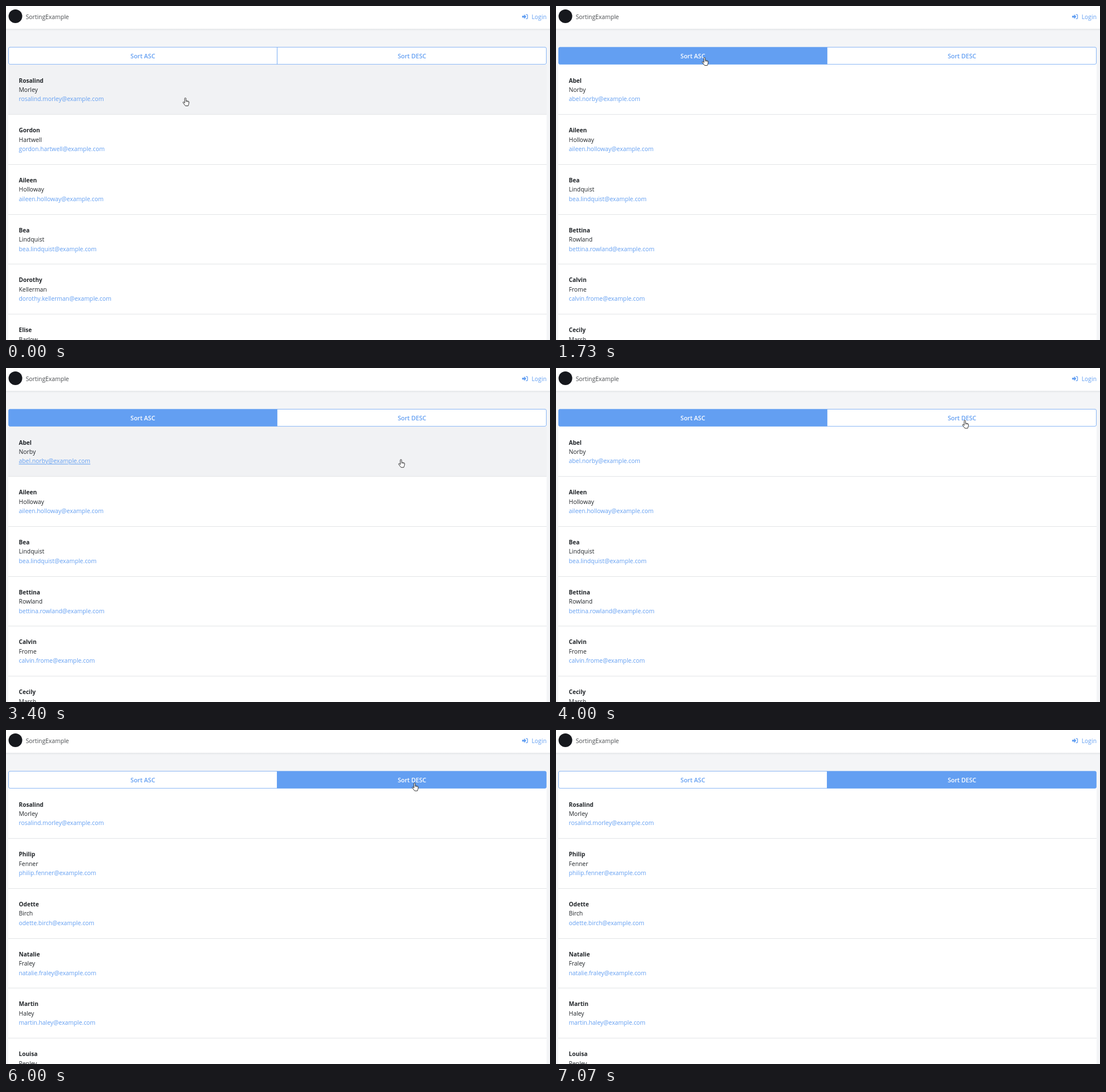
These frames come from a looping animation (954 by 587 pixels, 7870 ms). An HTML page:

```html
<!DOCTYPE html>
<html lang="en">
<head>
<meta charset="utf-8">
<title>SortingExample</title>
<style>
  html, body { margin: 0; width: 100%; height: 100%; overflow: hidden; background: #f4f5f7; }
  svg { display: block; width: 954px; height: 587px; font: 10.35px "Open Sans", "Noto Sans", sans-serif; fill: #212529; }
  .first { font-weight: 700; font-size: 10.1px; }
  .link { fill: #639ff2; }
  .hover .link { text-decoration: underline; }
  .button { font-weight: 600; font-size: 10.6px; text-anchor: middle; }
</style>
</head>
<body>
<svg viewBox="0 0 954 587">
  <defs>
    <linearGradient id="shade" x2="0" y2="1">
      <stop stop-color="#e4e6e8"/><stop offset="1" stop-color="#f4f5f7"/>
    </linearGradient>
  </defs>
  <rect width="954" height="40" fill="#fff"/>
  <rect y="40" width="954" height="4" fill="url(#shade)"/>
  <circle cx="16.5" cy="18" r="12" fill="#16181d"/>
  <text x="34.7" y="22.7" fill="#4a4d50">SortingExample</text>
  <path class="link" d="M905 17.2h3.5v-2.6l4 4.1-4 4.1v-2.6h-3.5z"/>
  <path d="M911.6 15.1h2q1 0 1 1v5.2q0 1-1 1h-2" fill="none" stroke="#639ff2" stroke-width="1.2"/>
  <text class="link" x="948" y="22.7" text-anchor="end">Login</text>
  <rect x="4" y="100" width="944" height="487" fill="#fff"/>
  <g id="rows"></g>
  <g id="buttons" stroke-width=".75"></g>
  <g id="hand" stroke="#222" stroke-width=".9" stroke-linejoin="round">
    <path fill="#fff" d="M-1.2 9V1.2a1.2 1.2 0 0 1 2.4 0V5l3.9.8q1.4.4 1.4 1.8l-.5 3.2-1.1 3.2H.2L-4 8.6q-.6-1 .4-1.4.8-.3 1.6.6z"/>
    <path fill="none" stroke-width=".6" d="M1.2 5v2.4M3 5.4v2M4.8 5.8v2"/>
  </g>
</svg>
<script>
const LOOP = 7870, TICK = 1000 / 15, TOP = 103, PITCH = 87.7, BLUE = "#639ff2";
const el = id => document.getElementById(id);

const lists = {
  start: ["Rosalind Morley", "Gordon Hartwell", "Aileen Holloway", "Bea Lindquist", "Dorothy Kellerman", "Elise Barlow"],
  asc: ["Abel Norby", "Aileen Holloway", "Bea Lindquist", "Bettina Rowland", "Calvin Frome", "Cecily Marsh"],
  desc: ["Rosalind Morley", "Philip Fenner", "Odette Birch", "Natalie Fraley", "Martin Haley", "Louisa Penley"]
};

// Fingertip path: tick, x, y
const path = [
  [1, 314.5, 161.5], [5, 261, 93], [6, 261, 93], [7, 261, 92], [10, 261, 92], [11, 260.5, 90.5],
  [40, 260.5, 90.5], [45, 447, 258.5], [52, 707, 155], [57, 717, 93], [59, 717, 93], [60, 717, 92],
  [89, 717, 92], [90, 716.5, 93], [101, 119, 556], [106, 115, 592]
];

function handAt(tick) {
  const i = path.findIndex(p => p[0] >= tick);
  if (i < 1) return path[i ? path.length - 1 : 0].slice(1);
  const [t0, x0, y0] = path[i - 1], [t1, x1, y1] = path[i];
  const u = (tick - t0) / (t1 - t0), k = u * u * (3 - 2 * u);
  return [x0 + (x1 - x0) * k, y0 + (y1 - y0) * k];
}

function row(name, i, hovered, underlined) {
  const [first, last] = name.split(" ");
  const email = `${first}.${last}@example.com`.toLowerCase();
  const y = TOP + i * PITCH, end = Math.floor(y + PITCH);
  const line = (text, n, cls) => `<text class="${cls}" x="22.5" y="${y + 31.6 + n * 16.4}">${text}</text>`;
  return `<g class="${underlined ? "hover" : ""}">
    ${hovered ? `<rect x="4" y="${y}" width="944" height="${PITCH}" fill="#f1f2f4"/>` : ""}
    <rect x="4" y="${end}" width="944" height="1" fill="#e3e5e7"/>
    ${line(first, 0, "first")}${line(last, 1, "last")}${line(email, 2, "link")}</g>`;
}

function button(label, x, active, outline) {
  return `<path d="${outline}" fill="${active ? BLUE : "#fff"}" stroke="${BLUE}"/>
    <text class="button" x="${x}" y="92.3" fill="${active ? "#fff" : BLUE}">${label}</text>`;
}

function draw(tick) {
  const [x, y] = handAt(tick);
  const hovered = y < 587 ? Math.floor((y - TOP) / PITCH) : -1;
  const list = tick < 26 ? lists.start : tick < 75 ? lists.asc : lists.desc;
  el("rows").innerHTML = list.map((name, i) => row(name, i, i === hovered, i === hovered && tick > 5)).join("");
  el("buttons").innerHTML =
    button("Sort ASC", 240, tick >= 22 && tick < 71, "M475.5 72.4H7q-2.5 0-2.5 2.5v25q0 2.5 2.5 2.5h468.5z") +
    button("Sort DESC", 712, tick >= 71, "M475.5 72.4H945q2.5 0 2.5 2.5v25q0 2.5-2.5 2.5H475.5z");
  el("hand").setAttribute("transform", `translate(${x} ${y})`);
}

let shown = -1;
function frame() {
  const tick = Math.floor((performance.now() % LOOP + 4) / TICK);
  if (tick !== shown) draw(shown = tick);
  requestAnimationFrame(frame);
}
frame();
</script>
</body>
</html>
```
